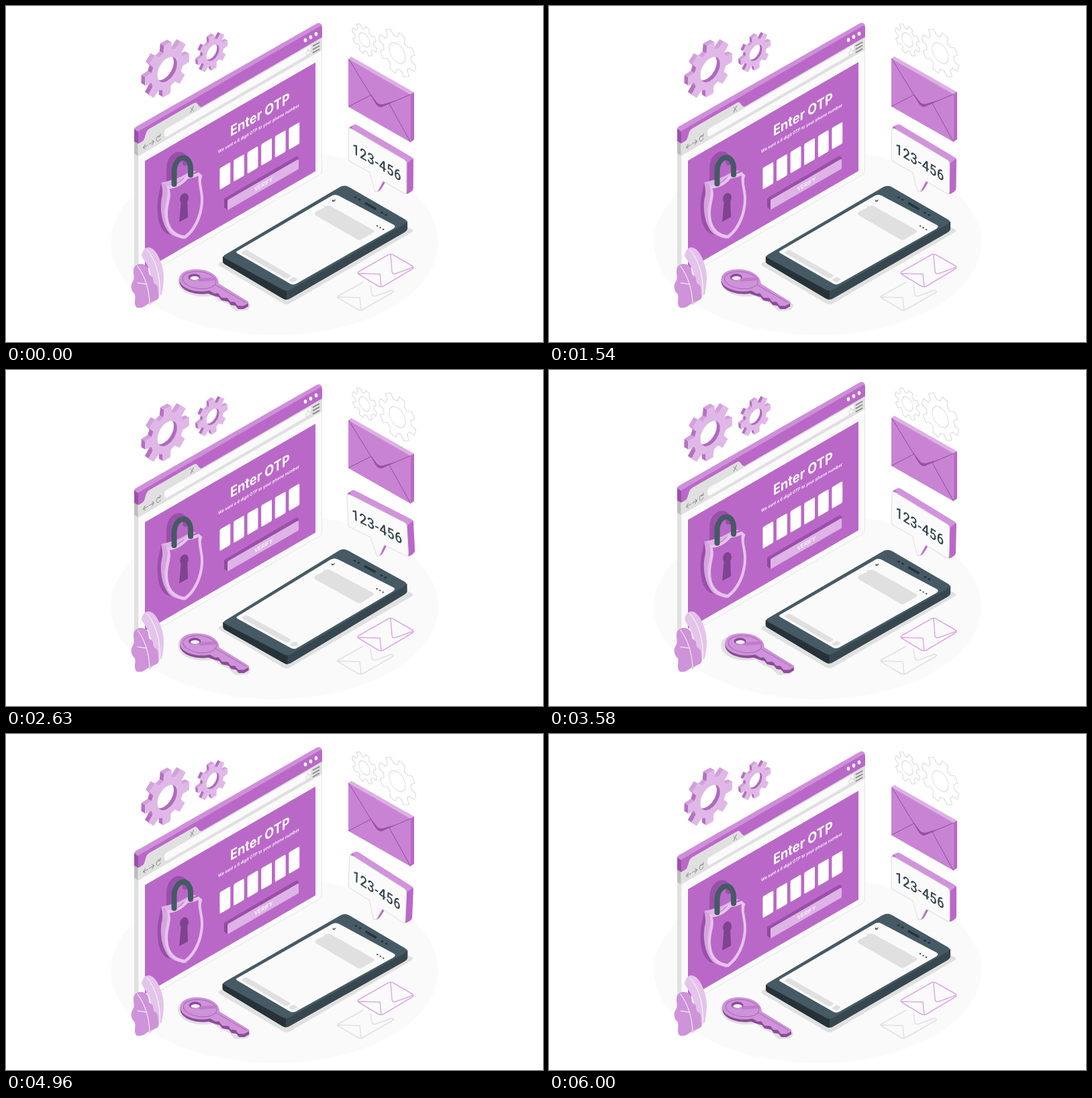
An HTML page for the animation above (6040 ms loop, 800 px wide and 500 px high).

```html
<!DOCTYPE html>
<html lang="en">
<head>
<meta charset="utf-8">
<title>Enter OTP</title>
<style>
  html, body { margin: 0; width: 100%; height: 100%; overflow: hidden; background: #fff; }
  svg { display: block; width: 800px; height: 500px; }
  text { font-family: Inter, "Open Sans", sans-serif; }
  .line { fill: none; stroke-linecap: round; stroke-linejoin: round; }
</style>
</head>
<body>
<svg viewBox="0 0 800 500">
  <ellipse cx="400" cy="352" rx="244" ry="138" fill="#fafafa"/>

  <g id="gears"></g>

  <!-- browser window -->
  <g id="browser">
    <path d="M191 203 L197 206 V407 L191 403 Z" fill="#e0e0e0"/>
    <path d="M191 201 L197 205 V224 L191 220 Z" fill="#bdbdbd"/>
    <path d="M191 183 L197 187 V205.500 L191 202 Z" fill="#9a4faa"/>
    <path d="M191 183.500 Q191 181.500 194 180 L463 26.600 Q467 24.600 470 28 L471 31 L197 188 Z" fill="#ce8fd9"/>
    <path d="M197 205 L470.500 47 V245 Q470.500 250 466 252.500 L197 407 Z" fill="#fafafa" stroke="#e6e6e6"/>
    <path d="M197 205 L471 47 V66 L197 224 Z" fill="#e0e0e0"/>
    <path d="M197 187 L467 31 Q471 29 471 33 V47 L197 205.500 Z" fill="#ba68c8"/>
    <path d="M202 203 C209 199 206 188 213 183.500 L280 145 C286 142 285 150 291 151 L291 153 L202 205 Z" fill="#e0e0e0"/>
    <path d="M239 183 L454 59 V70.500 L240 194.500 Q236 196 236 191 V188 Q236 185 239 183 Z" fill="#fafafa"/>
    <g fill="#fff">
      <ellipse cx="446" cy="51.500" rx="2.300" ry="3"/>
      <ellipse cx="454" cy="47" rx="2.300" ry="3"/>
      <ellipse cx="462" cy="42.300" rx="2.300" ry="3"/>
    </g>
    <g class="line" stroke="#8a8a8a" stroke-width="1">
      <path d="M275 152 L279.500 157 M279.500 149.500 L275 159"/>
      <path d="M204.500 211.500 L211.500 207.500 M207.500 206.500 L204.500 211.500 L207.500 213"/>
      <path d="M213.500 206 L220.500 202 M217.500 200.500 L220.500 202 L217.500 207"/>
      <path d="M229.500 194 C226 192 223 198 224.500 201 C226 203 229 201 230 198 M230 191 L229.700 194.500 L226.500 195.500"/>
      <path d="M457.500 60 L466.500 55 M457.500 65 L466.500 60 M457.500 70 L466.500 65" stroke-width="1.800"/>
      <path d="M450 64.500 L451.200 67.500 L454 66.500 L452 70 L452.500 73 L450 72.500 L447.500 75 L448 72 L446 70.500 L448.800 68.800 Z" stroke="#d0d0d0" stroke-width=".8"/>
    </g>
    <path d="M207 231 L461 84.500 V246.500 L207 393 Z" fill="#ba68c8"/>

    <text transform="matrix(.866 -.5 0 1 334 195)" font-size="21" font-weight="700" fill="#fff">Enter OTP</text>
    <text transform="matrix(.866 -.5 0 1 316 220)" font-size="6.600" font-weight="600" fill="#fff">We sent a 6 digit OTP to your phone number</text>
    <g id="digits" fill="#fff"></g>

    <path d="M325 287 L431 225 Q433 223 436 226 V230 L330 292 Z" fill="#9a4faa"/>
    <path d="M325 287 L330 290 V304 L325 300.500 Z" fill="#8e4a9b"/>
    <path d="M330 290.500 Q330 289.500 331.500 288.500 L434 229.300 Q436 228.300 436 230 V242 Q436 243 434.500 244 L331.500 303.500 Q330 304.300 330 302.500 Z" fill="#deb3e5"/>
    <text transform="matrix(.866 -.5 0 1 370 277)" font-size="9" font-weight="500" fill="#fff">VERIFY</text>

    <!-- padlock shield -->
    <path class="line" d="M243 264 V244 C243 226 254 219 262 222.500 C266 225 267 229 267 234" stroke="#9a4faa" stroke-width="8"/>
    <path d="M231 263 C230 274 226 283 225.500 298 C225.500 318 229 332 239 339 L262 347 L262 300 L250 262 Z" fill="#9a4faa"/>
    <path d="M240 269 L231 263.500 C233 272 234 278 232 286 C229 300 231 324 243 338 C249 344 257 345 264 347.500 L264 300 L250 260 Z" fill="#d6a4df"/>
    <path d="M231 263.500 L240 269 C249 269 255 265 264 257 L284 246 L277 246 C268 249 262 256 250 258 C241 262 236 262 231 263.500 Z" fill="#deb3e5"/>
    <path d="M239 268 C249 270 262 263 269 252 C276 252 283 250 287 248 L292.500 253 C288 263 294 274 294 288 C294 313 283 336 267 347 C248 345 237 333 236.500 309 C236.500 292 244 281 239 268 Z" fill="#e6c4ec"/>
    <path d="M243.500 272.500 C253 272.500 264 266 271 257.500 C278 257 283 255 287 253 C285 264 290 275 290 288 C290 310 280 332 266 342 C250 340 241 329 241 309 C241 294 247.500 284 243.500 272.500 Z" fill="#ba68c8"/>
    <path d="M261 289 L270 286 L271 315 L258 322 Z" fill="#7f4390"/>
    <ellipse cx="265.500" cy="287" rx="6.300" ry="8" transform="rotate(18 265.500 287)" fill="#7f4390"/>
    <path class="line" d="M250.500 265.500 V246 C250.500 236 256 227.500 263 226.500 C270 225.500 275 233 275 243 V252" stroke="#455a64" stroke-width="8"/>
  </g>

  <!-- closed envelope -->
  <g id="mail">
    <path d="M510 79 L514.500 76 L608 129 L603 133 Z" fill="#deb0e5"/>
    <path d="M602 132 L608 129 V199.500 L602 203.500 Z" fill="#ba68c8"/>
    <path d="M510 79 L603 132.500 V203.500 L510 150.500 Z" fill="#c884d3"/>
    <path d="M542 130 L552 147 Q557 153 563 149 L581 141 L562 146.500 Q556 148 552 143 Z" fill="#9a4faa"/>
    <path class="line" d="M511 80 L552 147 Q557 153 563 149 L602 132.500 M511 150 L544 133 M602 202 L571 146" stroke="#944da3" stroke-width="1"/>
  </g>

  <!-- speech bubble -->
  <g id="bubble">
    <path d="M510 186 Q510 182 514 179 L518 177 Q520 176 523 177.500 L605 225 Q607 226 607 229 L598 237 Z" fill="#d193db"/>
    <path d="M510 186 Q510 182 514 179 L517 184 Z" fill="#ba68c8"/>
    <path d="M596 235 L606 227 Q607 228 607 230 V271 Q607 274 604 276 L600 278.500 Q597 280 595 278 Z" fill="#ba68c8"/>
    <path d="M550 277 L555 276 Q558 275 560 271 L566 261 L560 257 Z" fill="#ba68c8"/>
    <path d="M510 186 Q510 181 515 183.500 L593 228.500 Q597 231 597 235 V275 Q597 281 592 278 L562 260.500 L555 274 Q551 280 549 273 L542 248 L513 232 Q510 230 510 227 Z" fill="#fafafa" stroke="#dedede"/>
    <text transform="matrix(.866 .5 0 1 516 219)" font-size="21.500" font-weight="500" fill="#37474f" letter-spacing=".6" style="font-family:Roboto,sans-serif">123-456</text>
  </g>

  <!-- phone -->
  <path d="M317 386 Q315 383 320 381 L500 276 L604 332 Q609 334 604 337 L424 442 Q418 446 412 442 Z" fill="#e0e0e0"/>
  <g id="phone">
    <path d="M323 373 V380 Q323 383 327 385 L412 435 Q418 439 424 435 L593 337 Q598 334 598 331 V320 L419 418 Z" fill="#37474f"/>
    <path d="M323 373 V380 Q323 383 327 385 L412 435 Q415 437 418 437 V423 Z" fill="#263238"/>
    <path d="M327 370 L497 269.500 Q504 265.500 511 269.500 L594 317 Q600 320.500 594 324 L424 422 Q418 425.500 412 422 L327 376 Q321 373 327 370 Z" fill="#455a64"/>
    <path d="M345 364.500 L484 283 Q490 279 496 282.500 L577 325 Q582 327.500 577 331 L433 413 Q428 416 423 413 L345 368.500 Q341 366.500 345 364.500 Z" fill="#fafafa"/>
    <path d="M462 306 L474 300 L473 297.500 L477 298 Q480 296 484 298 L547 333 Q550 335 547 337 L530 347 Q527 349 523 347 L462 312 Q458 309 462 306 Z" fill="#e0e0e0"/>
    <path d="M352 366 L355 364 Q357 362.500 360 364 L422 399.500 Q425 401.500 423 403 L421 404.500 Q418 406 415 404.500 L353 369 Q350 367 352 366 Z" fill="#e0e0e0"/>
    <path d="M422.500 407 L427 404 Q429 403 431 404 L434 406 Q435.500 407 434 408 L430 410.500 Q428 411.500 426 410.500 L423 409 Q421 408 422.500 407 Z" fill="#e0e0e0"/>
    <path class="line" d="M490.500 288.500 L486.500 290.500 M486.500 288.500 V290.500 H489" stroke="#37474f" stroke-width="1"/>
    <g fill="#263238">
      <ellipse cx="553" cy="327" rx="1.300" ry=".9"/><ellipse cx="557.500" cy="329.600" rx="1.300" ry=".9"/><ellipse cx="562" cy="332.200" rx="1.300" ry=".9"/>
      <ellipse cx="520.500" cy="284.800" rx="2" ry="1.400"/><ellipse cx="526.500" cy="288" rx="2" ry="1.400"/>
      <ellipse cx="560" cy="307.500" rx="2" ry="1.400"/><ellipse cx="566" cy="310.700" rx="2" ry="1.400"/>
    </g>
    <path class="line" d="M536 293.500 L550 301.500" stroke="#263238" stroke-width="3.500"/>
  </g>

  <!-- key -->
  <path d="M256 409 C257 396 276 394 290 396 C306 398 318 408 318 417 L364 444 Q365 449 358 453 L342 454 L331 444 L319 439 L308 431 C288 435 257 430 256 409 Z" fill="#e0e0e0"/>
  <g id="key">
    <path d="M258.500 406 V411 C260 423 280 431 301 428 L312 432 L317 433 L321 438 L331 440 L335 445 L342 446 L346 451 L354 451 L361 447 V441 Z" fill="#8e4a9b"/>
    <path d="M258.500 406 C259 396 272 391 287 392 C305 393 317 402 317 413 L361 440 V442.500 L353 446.500 L345 446 L341 440.500 L334 440 L330 434.500 L321 434 L316 427.500 L311 428 L303 423.500 C283 428 258 420 258.500 406 Z" fill="#ce93d8"/>
    <ellipse class="line" cx="288" cy="408" rx="25" ry="12.500" transform="rotate(7 288 408)" stroke="#ad62bc" stroke-width="1"/>
    <path d="M281 405 L313 404 L314 408 L289 410 Z" fill="#c07acb"/>
    <path class="line" d="M312 415 L357 441" stroke="#ad62bc" stroke-width="1"/>
    <ellipse cx="280.500" cy="403.500" rx="9" ry="5" fill="#8e4a9b"/>
    <ellipse cx="281" cy="405" rx="6.800" ry="3" fill="#f3eef4"/>
  </g>

  <!-- leaves -->
  <path d="M202 372 C203 362 209 357 216 360 C226 365 231 381 233 389 C237 405 234 418 232 429 L213 446 L216 400 C214 389 207 380 202 372 Z" fill="#e4c4ea"/>
  <path d="M195 449 C189 443 194 436 192 429 C186 424 185 416 189 410 C193 404 188 396 191 389 C195 383 204 382 209 387 C214 390 211 398 215 401 C221 403 218 409 221 413 C228 416 226 423 227 429 C229 437 224 438 218 440 C212 442 208 447 202 449 Z" fill="#ce93d8"/>
  <path class="line" d="M196 387 C207 402 213 421 214 442 M210 414 L196 412 M210 363 C223 377 231 404 229 432" stroke="#fff" stroke-width="1"/>

  <!-- outlined envelopes -->
  <g class="line" stroke-width="1.500">
    <path stroke="#e0e0e0" d="M532 411 L496 431 Q492 433 496 435 L524 451.500 Q528 454 532 451.500 L575 427 Q580 424 574 423 L551 431.500 Q546 433 545 428 L543 416 M495 433 L527 434 L529 452"/>
    <path stroke="#dcabe4" d="M526 395 L569 370.500 Q573 368 577 370.500 L605 386.500 Q609 389 605 391.500 L563 416.500 Q558 419 554 416.500 L526 399.500 Q522 397 526 395 Z M573 370 L575 395 Q576 400 581 398 L606 389 M525 398 L557 399 L559 417"/>
  </g>
</svg>
<script>
const get = id => document.getElementById(id);
const LOOP = 6040;

// Gear corners in an isometric plane; lean is -1 for left-facing, 1 for right-facing.
function gearPoints(x, y, R, root, lean, phase) {
  const n = 8, step = 2 * Math.PI / n, pts = [];
  const add = (r, a) => {
    const u = r * Math.cos(a), v = r * Math.sin(a);
    pts.push([x + .866 * u, y + v + lean * .5 * u]);
  };
  for (let i = 0; i < n; i++) {
    const a = i * step + phase;
    add(root, a - step * .32);
    add(R, a - step * .2);
    add(R, a + step * .2);
    add(root, a + step * .32);
  }
  return pts;
}
const outline = pts => 'M' + pts.map(p => p[0].toFixed(1) + ' ' + p[1].toFixed(1)).join('L') + 'Z';
const disc = (x, y, r, lean, attrs) =>
  `<circle r="${r}" transform="matrix(.866 ${lean * .5} 0 1 ${x} ${y})" ${attrs}/>`;

// Side walls run up and left; those facing left are darker than those facing up.
function walls(pts, depth) {
  const ox = -depth, oy = -depth * .58;
  return pts.map((a, i) => {
    const b = pts[(i + 1) % pts.length];
    const dx = b[0] - a[0], dy = b[1] - a[1];
    if (dy * ox - dx * oy <= 0) return '';
    const du = dx / .866, dv = dy + .5 * du;
    const quad = [a, b, [b[0] + ox, b[1] + oy], [a[0] + ox, a[1] + oy]];
    return `<path d="${outline(quad)}" fill="${-dv > du ? '#b570c2' : '#d3a0dc'}"/>`;
  }).join('');
}
function solidGear(id, x, y, R, root, hole, depth, phase) {
  const pts = gearPoints(x, y, R, root, -1, phase);
  return `<clipPath id="${id}">${disc(x, y, hole, -1, '')}</clipPath>` + walls(pts, depth)
    + `<path d="${outline(pts)}" fill="#e0b8e7" stroke="#e0b8e7" stroke-linejoin="round"/>`
    + disc(x, y, hole, -1, 'fill="#b06abd"')
    + `<g clip-path="url(#${id})">${disc(x - depth * .8, y - depth * .5, hole, -1, 'fill="#fff"')}</g>`;
}
function lineGear(x, y, R, root, hole) {
  const d = outline(gearPoints(x, y, R, root, 1, .26));
  return `<g class="line" stroke="#e0e0e0" stroke-width="1.300"><path d="${d}"/>${disc(x, y, hole, 1, '')}</g>`;
}
get('gears').innerHTML =
  solidGear('holeA', 240, 94.5, 38, 27.5, 17, 6, .03) +
  solidGear('holeB', 308, 69.5, 25.5, 18, 11, 4, -.08) +
  lineGear(534, 50.5, 21.5, 16, 9.5) +
  lineGear(583, 70, 32, 24, 14);

let cells = '';
for (let i = 0; i < 6; i++) {
  cells += `<rect width="18.300" height="32" rx="2" transform="matrix(.866 -.5 0 1 ${318.4 + i * 20.6} ${242 - i * 11.9})"/>`;
}
get('digits').innerHTML = cells;

// Linear interpolation through [position, value] steps.
function track(steps, p) {
  const i = steps.findIndex(s => s[0] >= p);
  if (i < 1) return steps[0][1];
  const [a, va] = steps[i - 1], [b, vb] = steps[i];
  return va + (vb - va) * (p - a) / (b - a);
}
const FLOAT = [[0, 0], [.5, -10], [1, 0]];
const SWAY = [[0, 0], [.25, 1], [.75, -1], [1, 0]];
const SHAKE = [[0, 0], [.1, -1], [.2, 2], [.3, -4], [.4, 4], [.5, -4],
  [.6, 4], [.7, -4], [.8, 2], [.9, -1], [1, 0]];

function draw(t) {
  const time = t * 6000 / LOOP + 42;
  const beat = time % 1500 / 1500;
  const lift = `translate(0 ${track(FLOAT, beat)})`;
  const sway = track(SWAY, beat);
  get('browser').setAttribute('transform', lift);
  get('mail').setAttribute('transform', lift);
  get('bubble').setAttribute('transform', `rotate(${sway * 3.3} 558.5 228)`);
  get('phone').setAttribute('transform', `rotate(${sway} 460 352)`);
  get('key').setAttribute('transform', `translate(${track(SHAKE, time % 6000 / 6000)} 0)`);
}
const start = performance.now();
function tick() {
  draw((performance.now() - start) % LOOP);
  requestAnimationFrame(tick);
}
tick();
</script>
</body>
</html>
```
